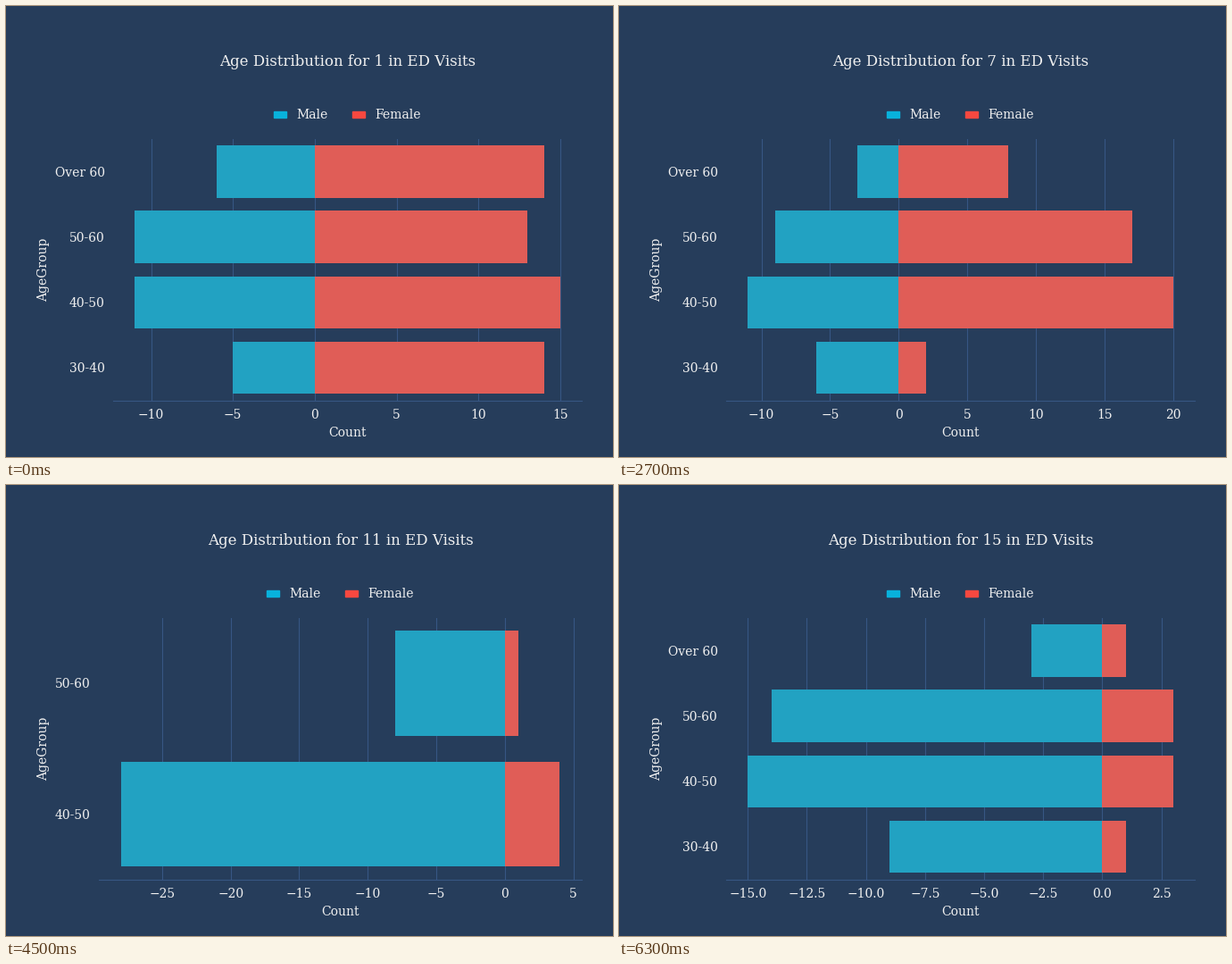
A matplotlib script for the animation above (8000 ms loop, 680 px wide and 505 px high).

```python
import matplotlib.pyplot as plt
import numpy as np
from matplotlib.animation import FuncAnimation
from matplotlib.patches import Rectangle
from matplotlib.transforms import IdentityTransform

W, H, DPI = 680, 505, 100
BG, LINE, INK = "#263d5b", "#375683", "#f0f0f0"
BARS = ("#22a2c2", "#e05d57")
KEYS = (("Male", "#08b2dc"), ("Female", "#f84840"))
GROUPS = np.array(["30-40", "40-50", "50-60", "Over 60"])

TOP, BOTTOM, RIGHT = 148.8, 441.6, 644.8
LEFT_WIDE, LEFT_SHORT = 120.35, 104.2   # with and without the long label
DIGIT = 8.83                            # advance of a tick label digit
STEP, TICK, LOOP, LAST = 450, 50, 8000, 15

# key visits: male and female counts, youngest group first
VISITS = {
    1: ((5, 11, 11, 6), (14, 15, 13, 14)),
    3: ((3, 21, 21, 7), (3, 8, 13, 4)),
    5: ((6, 12, 9, 3), (2, 23, 21, 9)),
    7: ((6, 11, 9, 3), (2, 20, 17, 8)),
    10: ((0, 28, 8, 0), (0, 3, 1, 0)),
    12: ((8, 13, 12, 5), (8, 20, 10, 4)),
    15: ((9, 15, 14, 3), (1, 3, 3, 1)),
}

plt.rcParams.update({
    "font.family": "DejaVu Serif",
    "font.size": 10,
    "text.color": INK,
    "axes.labelcolor": INK,
    "axes.edgecolor": LINE,
    "axes.axisbelow": True,
    "figure.facecolor": BG,
    "axes.facecolor": BG,
    "savefig.facecolor": BG,
})

fig = plt.figure(figsize=(W / DPI, H / DPI), dpi=DPI)
ax = fig.add_axes([0, 0, 1, 1])
PIXELS = IdentityTransform()


def counts(visit):
    """Whole counts, eased in slowly from one key visit to the next."""
    a = max(k for k in VISITS if k <= visit)
    b = min(k for k in VISITS if k >= visit)
    t = ((visit - a) / max(1, b - a)) ** 5
    start, end = np.array(VISITS[a]), np.array(VISITS[b])
    return np.rint(start + t * (end - start)).astype(int)


def place_axes(left, right):
    ax.set_position([left / W, 1 - BOTTOM / H,
                     (right - left) / W, (BOTTOM - TOP) / H])


def overhang(left, lo, hi):
    """Pixels by which the last tick label passes the right end of the axis."""
    last = max(t for t in ax.get_xticks() if t <= hi)
    x = left + (last - lo) / (hi - lo) * (RIGHT - left)
    return max(0, x + len(str(int(last))) * DIGIT / 2 - RIGHT)


def draw_header(visit, center):
    ax.text(center, H - 67, f"Age Distribution for {visit} in ED Visits",
            size=12, ha="center", va="baseline", transform=PIXELS)
    for i, (label, color) in enumerate(KEYS):
        x = center - 82.4 + 88 * i
        ax.add_patch(Rectangle((x, H - 125), 13.9, 7, color=color, lw=1,
                               transform=PIXELS, clip_on=False))
        ax.text(x + 25, H - 126.2, label, va="baseline", transform=PIXELS)


def draw_visit(visit):
    data = counts(visit)
    shown = data.any(axis=0)
    names = GROUPS[shown]
    male, female = data[:, shown]
    spots = np.arange(len(names))

    ax.clear()
    ax.barh(spots, -male, height=0.8, color=BARS[0])
    ax.barh(spots, female, height=0.8, color=BARS[1])

    margin = 0.05 * (male.max() + female.max())
    lo, hi = -male.max() - margin, female.max() + margin
    ax.set_xlim(lo, hi)
    ax.set_ylim(-0.5, len(names) - 0.5)
    ax.set_yticks(spots, names)

    left = LEFT_WIDE if shown[-1] else LEFT_SHORT
    place_axes(left, RIGHT)
    right = RIGHT - overhang(left, lo, hi)
    place_axes(left, right)

    ax.grid(axis="x", color=LINE, lw=0.8)
    ax.tick_params(length=0, pad=7, labelcolor=INK)
    ax.spines[["left", "right", "top"]].set_visible(False)
    ax.set_xlabel("Count")
    ax.set_ylabel("AgeGroup")
    draw_header(visit, (left + right) / 2)


def update(frame):
    draw_visit(min(frame * TICK // STEP + 1, LAST))
    return []


anim = FuncAnimation(fig, update, frames=LOOP // TICK, interval=TICK,
                     init_func=lambda: [], repeat=True, repeat_delay=0)
plt.show()
```
